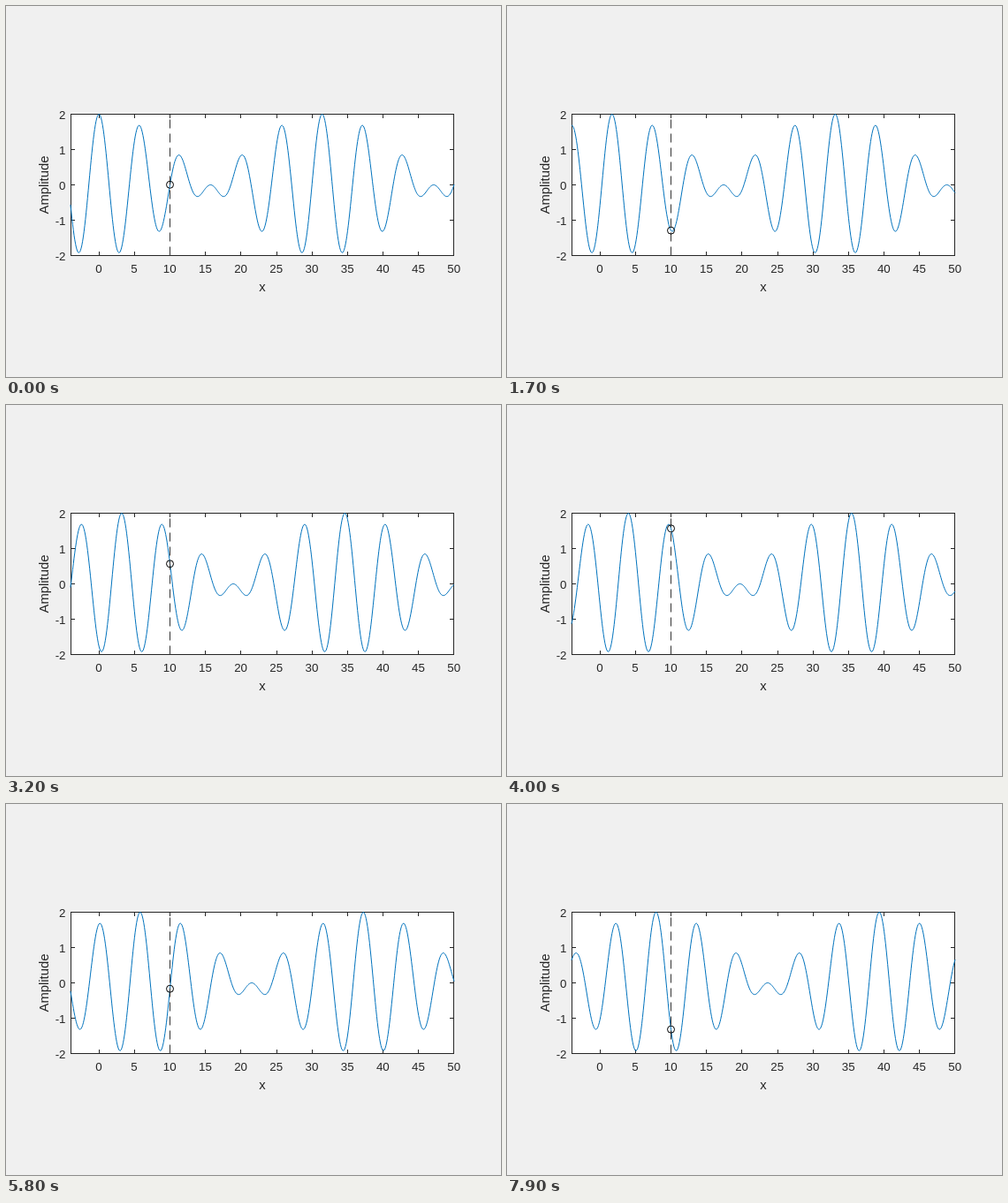
An HTML page for the animation above (8 s loop, 560 px wide and 420 px high).

```html
<!DOCTYPE html>
<html lang="en">
<head>
<meta charset="utf-8">
<title>Travelling wave packet</title>
<style>
  html, body { margin: 0; width: 100%; height: 100%; overflow: hidden; background: #f0f0f0; }
  svg { display: block; width: 560px; height: 420px; }
  text { font-family: "Liberation Sans", Arial, sans-serif; font-size: 13.33px; fill: #262626; }
  .label { font-size: 14.8px; text-anchor: middle; }
  .line { fill: none; stroke-width: 1; }
</style>
</head>
<body>
<svg viewBox="0 0 560 420">
  <rect x="73" y="122" width="434" height="161" fill="#fff"/>
  <g id="axes" class="line" stroke="#262626">
    <rect x="73.5" y="122.5" width="433" height="160"/>
    <path id="ticks"/>
  </g>
  <g id="numbers"></g>
  <text class="label" x="290" y="323">x</text>
  <text class="label" transform="translate(48 202.5) rotate(-90)">Amplitude</text>
  <path id="wave" class="line" stroke="#0072bd" stroke-linejoin="round"/>
  <path class="line" stroke="#333" stroke-dasharray="10 6" d="M185.5 282.5V122.5"/>
  <circle id="probe" class="line" stroke="#000" cx="185.5" r="4"/>
</svg>
<script>
const LOOP = 8000, STEP = 100, PROBE_X = 10;
const get = id => document.getElementById(id);
const px = x => 73 + (x + 4) * 434 / 54;
const py = y => 202.5 - y * 40;
const snap = v => Math.min(Math.floor(v), 506) + 0.5;

// Two cosines moving together at one unit per second
const wave = (x, t) => Math.cos(x - t) + Math.cos(1.2 * (x - t));

function addNumber(value, x, y, anchor) {
  const el = document.createElementNS("http://www.w3.org/2000/svg", "text");
  el.setAttribute("x", x);
  el.setAttribute("y", y);
  el.setAttribute("text-anchor", anchor);
  el.textContent = value;
  get("numbers").append(el);
}

function buildAxes() {
  let d = "";
  for (let x = 0; x <= 50; x += 5) {
    d += `M${snap(px(x))} 282.5v-4.5M${snap(px(x))} 122.5v4.5`;
    addNumber(x, px(x) - 0.3, 302, "middle");
  }
  for (let y = -2; y <= 2; y++) {
    d += `M73.5 ${py(y)}h4.5M506.5 ${py(y)}h-4.5`;
    addNumber(y, 67.5, py(y) + 5.5, "end");
  }
  get("ticks").setAttribute("d", d);
}

function draw(ms) {
  const t = Math.floor((ms % LOOP) / STEP) * STEP / 1000;
  const points = [];
  for (let i = -40; i <= 500; i++) {
    const x = i / 10;
    points.push(px(x).toFixed(2) + " " + py(wave(x, t)).toFixed(2));
  }
  get("wave").setAttribute("d", "M" + points.join("L"));
  get("probe").setAttribute("cy", py(wave(PROBE_X, t)));
}

buildAxes();
draw(0);
const start = performance.now();
function tick() {
  draw(performance.now() - start);
  requestAnimationFrame(tick);
}
requestAnimationFrame(tick);
</script>
</body>
</html>
```
